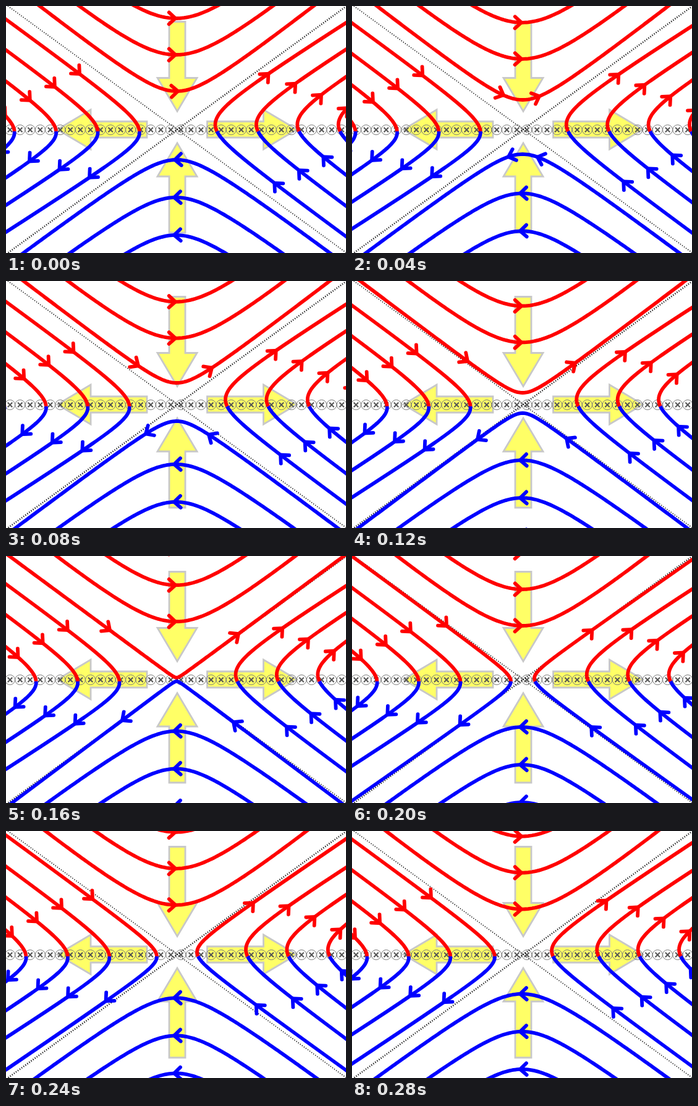
An HTML page with a canvas for the animation above (320 ms loop, 550 by 400 pixels).

```html
<!DOCTYPE html>
<html lang="en">
<head>
<meta charset="utf-8">
<title>Magnetic reconnection</title>
<style>
html, body { margin: 0; width: 100%; height: 100%; overflow: hidden; background: #fff; }
canvas { display: block; width: 550px; height: 400px; }
</style>
</head>
<body>
<canvas id="stage" width="550" height="400"></canvas>
<script>
const ctx = document.getElementById('stage').getContext('2d');
const W = 550, H = 400, CX = 277, CY = 200;
const RED = '#f00', BLUE = '#00f', LINE = 5.8;
const STEP = 40, STEPS = 8, SPLIT = 203;

// Innermost field lines on their way to the X point, one entry per step.
const upperMerge = { apex: [138, 152, 165, 181, 197], bend: [40, 34, 27, 19, 3],
                     tips: [[278], [245, 303], [214, 333], [187, 361], [168, 376]] };
const lowerMerge = { apex: [249, 240, 227, 214, 203], bend: [39, 33, 24, 14, 3],
                     tips: [[273], [253, 300], [226, 328], [203, 347], [188, 368]] };

function polyline(points, color, width) {
  ctx.beginPath();
  for (const [x, y] of points) ctx.lineTo(x, y);
  ctx.strokeStyle = color;
  ctx.lineWidth = width;
  ctx.stroke();
}

function arrowhead(x, y, angle, color) {
  const arm = side => {
    const a = angle + Math.PI + side * 0.74;
    return [x + 14 * Math.cos(a), y + 14 * Math.sin(a)];
  };
  ctx.lineCap = 'round';
  polyline([arm(1), [x, y], arm(-1)], color, LINE);
  ctx.lineCap = 'butt';
}

function range(from, to, map) {
  const out = [];
  for (let v = from; v < to; v += 3) out.push(map(v));
  out.push(map(to));
  return out;
}

// Line opening upward (dir -1) or downward (dir 1).
function archLine(dir, apex, bend, tips, mid = 275) {
  const color = dir < 0 ? RED : BLUE;
  const slope = dir < 0 ? 0.735 + 0.0012 * bend : 0.75;
  const yAt = x => apex + dir * (Math.hypot(bend, slope * (x - mid)) - bend);
  polyline(range(-6, W + 6, x => [x, yAt(x)]), color, LINE);
  for (const x of tips) {
    arrowhead(x, yAt(x), Math.atan2(-dir * (yAt(x + 1) - yAt(x - 1)), -dir * 2), color);
  }
}

// Line opening to the left (dir -1) or right (dir 1): red above, blue below.
function sideLine(dir, apex) {
  const grown = Math.min(1, Math.max(0, (Math.abs(apex - CX) - 20) / 40));
  const left = dir < 0;
  const y0 = left ? 203 + 2 * grown : 198 - 6 * grown;
  const up = left
    ? { slope: 0.733 - 0.008 * grown, bend: 20 + 20 * grown }
    : { slope: 0.7 - 0.07 * grown, bend: 20 + 36 * grown };
  const down = {
    slope: left ? 0.7 - 0.063 * grown : 0.715 + 0.015 * grown,
    bend: 20 + 20 * grown
  };
  const xAt = y => {
    const { slope, bend } = y < y0 ? up : down;
    return apex + dir * (Math.hypot(bend, (y - y0) / slope) - bend);
  };
  polyline(range(-6, SPLIT, y => [xAt(y), y]), RED, LINE);
  polyline(range(SPLIT, H + 6, y => [xAt(y), y]), BLUE, LINE);

  // Horizontal distance of each arrowhead from the apex.
  const u = left ? 216 - apex : apex - 338;
  const redReach = left ? Math.min(97 - 0.405 * u, 104) : Math.min(88 - 0.37 * u, 86 - 0.17 * u);
  const blueReach = left ? Math.min(81 - 0.28 * u, 82.5) : Math.min(96 - 0.405 * u, 103 + 0.25 * u);
  const head = (reach, side, { slope, bend }, color) => {
    if (reach <= 0) return;
    const y = y0 + side * slope * Math.sqrt((reach + bend) ** 2 - bend ** 2);
    arrowhead(xAt(y), y, Math.atan2(-dir, -side), color);
  };
  head(redReach, -1, up, RED);
  head(blueReach, 1, down, BLUE);
}

function flowArrow(x, y, angle) {
  ctx.save();
  ctx.translate(x, y);
  ctx.rotate(angle);
  ctx.beginPath();
  for (const [px, py] of [[0, -13], [91, -13], [91, -32], [145, 0], [91, 32], [91, 13], [0, 13]]) {
    ctx.lineTo(px, py);
  }
  ctx.closePath();
  ctx.fillStyle = '#ff6';
  ctx.fill();
  ctx.strokeStyle = '#c8c8c8';
  ctx.lineWidth = 2.8;
  ctx.stroke();
  ctx.restore();
}

function backdrop() {
  ctx.fillStyle = '#fff';
  ctx.fillRect(0, 0, W, H);
  flowArrow(CX, 25.5, Math.PI / 2);
  flowArrow(CX, 367, -Math.PI / 2);
  flowArrow(228, CY, Math.PI);
  flowArrow(325.5, CY, 0);

  for (let i = 0; i < 34; i++) {
    const x = 6.5 + 16.26 * i, r = 3.7;
    ctx.beginPath();
    ctx.arc(x, CY + 0.5, 8, 0, 2 * Math.PI);
    ctx.strokeStyle = '#777';
    ctx.lineWidth = 1;
    ctx.stroke();
    polyline([[x - r, CY + 0.5 - r], [x + r, CY + 0.5 + r]], '#555', 2);
    polyline([[x - r, CY + 0.5 + r], [x + r, CY + 0.5 - r]], '#555', 2);
  }

  ctx.setLineDash([1.2, 2.6]);
  polyline([[3, 0], [551, H]], '#000', 1.7);
  polyline([[551, 0], [3, H]], '#000', 2.6);
  ctx.setLineDash([]);
}

function draw(k) {
  backdrop();
  for (let j = -1; j < 2; j++) archLine(-1, 20 + 6.8 * k + 59 * j, 62, [274]);
  for (let j = 0; j < 3; j++) archLine(1, 310 - 6.6 * k + 61 * j, 47, [272]);
  for (let j = 0; j < 4; j++) {
    sideLine(-1, 216 - 8.1 * k - 67.4 * j);
    sideLine(1, 338.5 + 8.25 * k + 66.4 * j);
  }
  if (k < 5) {
    archLine(-1, upperMerge.apex[k], upperMerge.bend[k], upperMerge.tips[k], 276);
    archLine(1, lowerMerge.apex[k], lowerMerge.bend[k], lowerMerge.tips[k], 276);
  } else {
    sideLine(-1, 257 - 13 * (k - 5));
    sideLine(1, 295 + 14 * (k - 5));
  }
}

const start = performance.now();
let shown = -1;
function tick() {
  const k = Math.floor((performance.now() - start) / STEP) % STEPS;
  if (k !== shown) draw(shown = k);
  requestAnimationFrame(tick);
}
tick();
</script>
</body>
</html>
```
